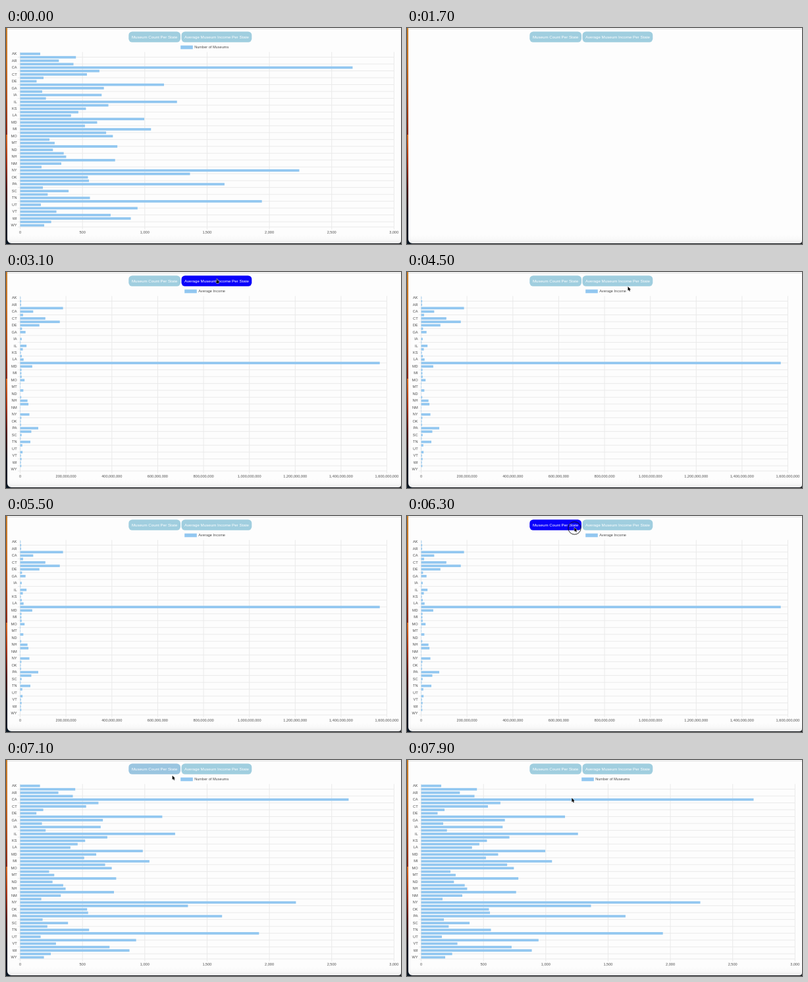
Recreate the animation shown at these times as an HTML page with a canvas. Size 600 px wide and 330 px high, loop 8 s.

```html
<!DOCTYPE html>
<html lang="en">
<head>
<meta charset="utf-8">
<title>Museums per state</title>
<style>
html, body { margin: 0; width: 600px; height: 330px; overflow: hidden; }
canvas { display: block; }
</style>
</head>
<body>
<canvas id="stage" width="600" height="330"></canvas>
<script>
const ctx = document.getElementById('stage').getContext('2d');
const LOOP = 8000, STEP = 100, GROW = 1000;
const LEFT = 21.5, TOP = 36.7, BOTTOM = 304, ROW = 5.24, TICK = 3.7;
const BAR = '#92c7f0', GRID = '#eaeaea', INK = '#4c4c4c';

// Each chart ranks the states from highest to lowest; the value follows a curve over the rank.
const counts = {
  label: 'Number of Museums', legendX: 265.2, tick: 500, ticks: 6, gap: 94.64,
  ranking: ('CA NY TX PA OH IL FL MI MA VA WI NC NJ MO WA IN MN GA IA CO MD TN OR OK CT KS ME ' +
    'KY AL AZ LA SC NH NE NM AR VT MT ND WV MS SD ID WY DC RI HI NV UT AK DE').split(' '),
  curve: [[0, 2668], [1, 2240], [3, 1640], [4, 1363], [7, 1050], [10, 888], [11, 780],
    [20, 618], [21, 560], [26, 520], [27, 467], [36, 291], [43, 193], [49, 161], [50, 132]]
};
const incomes = {
  label: 'Average Income', legendX: 271.2, tick: 200e6, ticks: 8, gap: 69.63,
  ranking: ('MA AZ DC CT DE PA CA MD RI TN NY NJ NH IL GA MO LA NC CO IN VA TX FL KY IA MN SC WA ' +
    'ME MI OH WV NE AL AR OR VT WI KS OK SD AK ID MS MT NM NV UT ND WY HI').split(' '),
  curve: [[0, 1569e6], [1, 187e6], [2, 173e6], [3, 110e6], [4, 84e6], [5, 79e6], [6, 57e6],
    [12, 32e6], [16, 15e6], [23, 7e6], [50, 0]]
};
const STATES = [...counts.ranking].sort();

// Pointer moves: start, end, x, y
const HOME = [320, 10.5];
const moves = [[4000, 4400, 335.5, 22.3], [5000, 5100, 333, 15.5], [5700, 6200, 254.3, 17.5],
  [6800, 7400, 251, 30], [7400, 7600, 249.7, 55.5], [7700, 7900, 250.3, 58]];

const clamp = v => Math.min(1, Math.max(0, v));
const mix = (a, b, k) => a + (b - a) * k;
const smooth = (t, start, end) => {
  const k = clamp((t - start) / (end - start));
  return k * k * (3 - 2 * k);
};
const fade = (t, start) => smooth(t, start, start + 400);

function curveAt(points, x) {
  const i = Math.max(1, points.findIndex(p => p[0] >= x));
  const [x0, y0] = points[i - 1], [x1, y1] = points[i];
  return mix(y0, y1, (x - x0) / (x1 - x0));
}

function text(str, x, y, size, color, align = 'left') {
  ctx.font = `${size}px "Liberation Sans", Arial, sans-serif`;
  ctx.fillStyle = color;
  ctx.textAlign = align;
  ctx.textBaseline = 'middle';
  ctx.fillText(str, x, y);
}

function rect(x, y, w, h, color) {
  ctx.fillStyle = color;
  ctx.fillRect(x, y, w, h);
}

function roundRect(x, y, w, h, radius, color) {
  ctx.beginPath();
  ctx.roundRect(x, y, w, h, radius);
  ctx.fillStyle = color;
  ctx.fill();
}

function gradient(y0, y1, ...colors) {
  const g = ctx.createLinearGradient(0, y0, 0, y1);
  colors.forEach((c, i) => g.addColorStop(i / (colors.length - 1), c));
  return g;
}

function drawWindow() {
  rect(0, 0, 600, 330, '#16191d');
  rect(0, 0, 8, 163, gradient(0, 163, '#c87f2c', '#c9701f', '#b34d16', '#8a2410'));
  rect(0, 163, 8, 167, gradient(163, 330, '#d9691f', '#a8300f', '#4a1010', '#10131f', '#0b1622'));
  roundRect(2, -10, 598, 339, [0, 0, 4, 6], gradient(316, 329, '#fdfdfd', '#f9f9f9', '#ececec'));
  rect(2, 1, 598, 1, '#dedede');
}

function drawButton(label, x, w, hover) {
  const [r, g, b] = [[160, 10], [206, 0], [223, 250]].map(([a, z]) => Math.round(mix(a, z, hover)));
  roundRect(x, 5.5, w, 16.3, 5.5, `rgb(${r}, ${g}, ${b})`);
  text(label, x + w / 2, 14, 6.2, '#fff', 'center');
}

function drawChart({ label, legendX, tick, ticks, gap, ranking, curve }, progress) {
  const width = gap * ticks;
  for (let i = 0; i <= ticks; i++) {
    const x = LEFT + gap * i;
    rect(x - 0.5, TOP, 1, BOTTOM + TICK - TOP, GRID);
    text((tick * i).toLocaleString('en-US'), x, 312.8, 5.62, INK, 'center');
  }
  const rowLine = y => rect(LEFT - TICK, y - 0.5, width + TICK, 1, GRID);
  rowLine(BOTTOM);
  STATES.forEach((state, i) => {
    const y = TOP + ROW * (i + 0.5);
    if (i % 2) rowLine(y);
    else text(state, 16.6, y + 0.3, 5.62, INK, 'right');
    const value = curveAt(curve, ranking.indexOf(state));
    rect(LEFT, y - 1.7, value / tick * gap * progress, 3.75, BAR);
  });
  rect(legendX, 26.7, 18.6, 5.6, BAR);
  text(label, legendX + 21, 29.7, 5.62, INK);
}

function drawPointer(t) {
  if (t < 2600 || (t >= 5500 && t < 5700)) return;
  let [x, y] = HOME;
  for (const [start, end, toX, toY] of moves) {
    const k = smooth(t, start, end);
    x = mix(x, toX, k);
    y = mix(y, toY, k);
  }
  const shape = new Path2D(t < 4100
    ? 'M0 0L1.2 0L1.4 2.8L4 3.4L4.2 5.4L3.4 7.6L0 7.6L-2 4.4L-1.2 3.9L0 5Z'
    : 'M0 0L0 7L1.6 5.6L2.8 8.2L4 7.6L2.9 5.2L5 5Z');
  ctx.save();
  ctx.translate(x, y);
  ctx.scale(0.88, 0.88);
  ctx.lineJoin = 'round';
  ctx.lineWidth = 1;
  ctx.strokeStyle = '#fff';
  ctx.stroke(shape);
  ctx.fillStyle = '#000';
  ctx.fill(shape);
  ctx.restore();
  if (t >= 6200 && t < 6400) {
    ctx.beginPath();
    ctx.arc(x + 0.2, y + 1, 9.7, 0, Math.PI * 2);
    ctx.strokeStyle = '#111';
    ctx.lineWidth = 0.9;
    ctx.stroke();
  }
}

function draw(t) {
  drawWindow();
  drawButton('Museum Count Per State', 186.3, 78.7, fade(t, 5750) - fade(t, 6750));
  drawButton('Average Museum Income Per State', 266.5, 106.8, fade(t, 2500) - fade(t, 4000));
  const grow = start => 1 - (1 - clamp((t - start) / GROW)) ** 4;
  if (t < 1700) drawChart(counts, 1);
  else if (t >= 1800 && t < 6400) drawChart(incomes, grow(1731));
  else if (t >= 6500) drawChart(counts, grow(6431));
  drawPointer(t);
}

function frame() {
  draw(Math.floor(performance.now() % LOOP / STEP) * STEP);
  requestAnimationFrame(frame);
}
frame();
</script>
</body>
</html>
```
